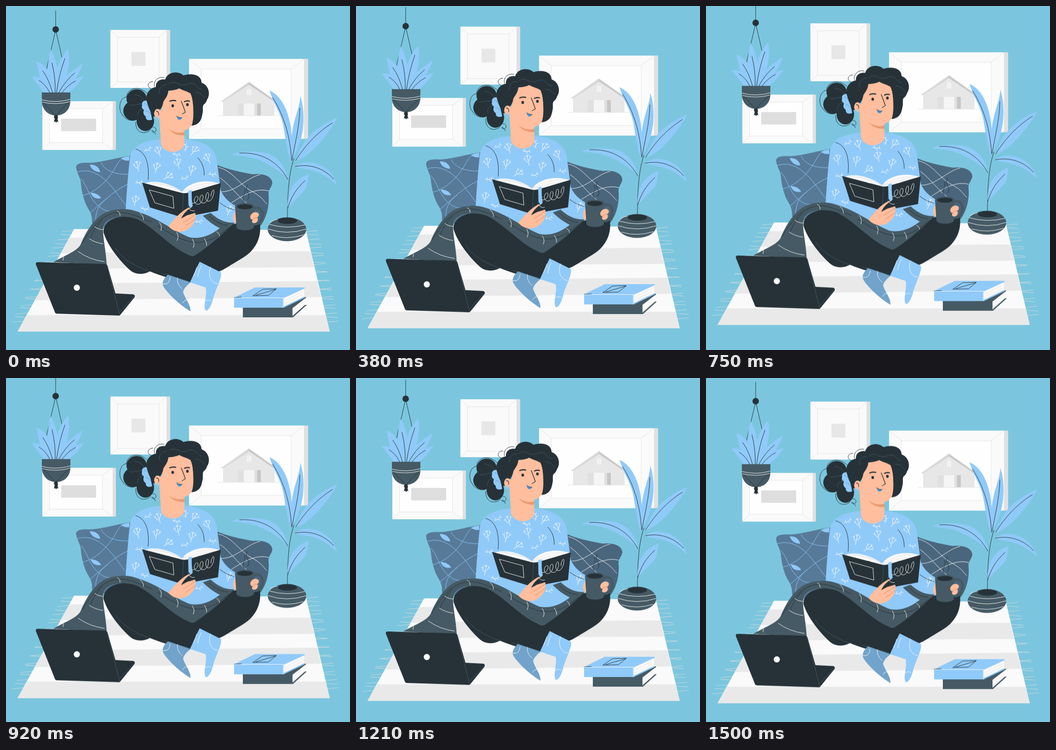
Write an HTML page without scripts that moves like this. It is 748 by 748 pixels and loops after 1.54 s.

```html
<!DOCTYPE html>
<html lang="en">
<head>
<meta charset="utf-8">
<title>Reading at home</title>
<style>
  html, body { margin: 0; width: 100%; height: 100%; overflow: hidden; background: #7bc6de; }
  svg { display: block; width: 100%; height: 100%; }
  .scene { animation: float 1540ms linear infinite; }
  @keyframes float {
    0%, 100% { transform: translateY(0); }
    8.4% { transform: translateY(-2.3px); }
    50% { transform: translateY(-14.8px); }
    86.4% { transform: translateY(-3.4px); }
  }
  .ink { fill: #263238; }
  .slate { fill: #455a64; }
  .sky { fill: #90caf9; }
  .skin { fill: #ffbe9d; }
  .paper { fill: #fafafa; }
  .shade { fill: #e0e0e0; }
  .grey { fill: #e7e7e7; }
  .line { fill: none; stroke: #263238; stroke-width: 1; stroke-linecap: round; stroke-linejoin: round; }
  .white { stroke: #fafafa; }
  .pale { stroke: #e4e4e4; }
  .blue { stroke: #90caf9; }
  .dim { stroke: #455a64; }
  .fringe { fill: none; stroke: #d5dcda; stroke-width: 27; }
</style>
</head>
<body>
<svg viewBox="0 0 748 748" aria-label="Woman reading a book on a rug">
  <defs>
    <path id="sprig" class="line white" d="M0 11Q1 2 0-8M0 4Q-5 2-6-4M0 1Q5-1 6-6M0-8l-3-3M0-8V-12M0-8l3-3M-6-4l-3-1M-6-4l0-4M6-6l3-1M6-6v-4"/>
    <path id="twig" class="line white" d="M-6 3Q0 3 6-3M-2 3l-2-5M2 1l5 2M6-3l0-4M6-3l4 0"/>
    <g id="fringe" class="fringe">
      <path stroke-dasharray=".9 17" d="M0 4V210" transform="skewY(-5)"/>
      <path stroke-dasharray=".9 19" d="M0 12V206" transform="skewY(4)"/>
    </g>
  </defs>
  <rect width="748" height="748" fill="#7bc6de"/>

  <g class="scene">
    <!-- Wall pictures -->
    <g>
      <path class="shade" d="M349 52h8v126h-8z"/>
      <path class="paper" d="M227 52h122v126H227z"/>
      <path class="line pale" d="M243 68h90v97h-90zM227 52l16 16M349 52l-16 16M227 178l16-13M349 178l-16-13"/>
      <path class="grey" d="M273 100h30v30h-30z"/>
    </g>
    <g>
      <path class="shade" d="M648 115h9v174h-9z"/>
      <path class="paper" d="M398 115h250v174H398z"/>
      <path fill="#fefefe" d="M425 137h195v130H425z"/>
      <path class="line pale" d="M425 137h195v130H425zM398 115l27 22M648 115l-28 22M398 289l27-22M648 289l-28-22"/>
      <path class="grey" d="M472 238v-32l56-38 56 38v32z"/>
      <path fill="#c9c9c9" d="M528 165l61 43h-6l-55-37-56 37h-5z"/>
      <path fill="#dcdcdc" d="M528 165l-61 43h5l56-39z"/>
      <path class="shade" d="M504 212h50v26h-50z"/>
      <path fill="#f5f5f5" d="M517 212h23v26h-23z"/>
      <path fill="#c6c6c6" d="M546 212h8v26h-8z"/>
      <path fill="#f5f5f5" d="M524 182l4-3 5 3v12h-9z"/>
      <path class="line pale" d="M528 180v14M460 238.5h134"/>
    </g>
    <g>
      <path class="shade" d="M232 207h7v106h-7z"/>
      <path class="paper" d="M79 207h153v106H79z"/>
      <path fill="#fefefe" d="M95 223h115v74H95z"/>
      <path class="line pale" d="M95 223h115v74H95zM79 207l16 16M232 207l-22 16M79 313l16-16M232 313l-22-16"/>
      <path fill="#dedede" d="M120 245h76v27h-76z"/>
    </g>

    <!-- Hanging plant -->
    <path class="line" d="M108 10V52L86 146M108 52l16 70"/>
    <circle class="ink" cx="108" cy="51" r="7"/>
    <g class="sky">
      <path d="M56 154C76 152 92 162 104 188H82C74 176 66 168 56 154z"/>
      <path d="M66 120C88 127 102 152 108 188H90C74 168 71 141 66 120z"/>
      <path d="M97 95C109 112 119 155 112 188H98C88 164 89 121 97 95z"/>
      <path d="M135 94C142 120 131 167 117 188H103C103 154 115 112 135 94z"/>
      <path d="M167 125C160 148 142 177 121 188H108C115 160 143 142 167 125z"/>
      <path d="M169 153C160 166 149 180 136 188H112C126 167 149 157 169 153z"/>
    </g>
    <path class="line" d="M72 162Q86 170 95 188M80 141Q94 161 101 188M100 124Q108 156 107 188M128 114Q115 150 110 188M149 146Q129 162 115 188M151 163Q135 171 122 188"/>
    <path class="slate" d="M78 188h62v18C140 226 126 238 109 238S78 226 78 206z"/>
    <path class="line" d="M79 208Q94 222 108 239Q122 222 139 208"/>
    <path class="line white" d="M78 204Q109 212 140 203M79 209Q109 216 139 208"/>
    <path class="ink" d="M106 237h6l1 6-1 3 2 6-3-1-2 3-2-3-3 1 2-7-2-4z"/>

    <!-- Rug -->
    <use href="#fringe" transform="translate(138 485) skewX(-28.9)"/>
    <use href="#fringe" transform="translate(664 485) skewX(13)"/>
    <path class="paper" d="M148 485L652 487 704 708H25z"/>
    <path fill="#e9e9e9" d="M138 504L212 504V538L119 538zM200 536L662 533 670 568 200 571zM83 604L677 598 685 633 63 640zM46 672H695L704 708H25z"/>

    <!-- Cushions -->
    <path fill="#577a98" d="M153 354C149 341 166 340 183 341C215 339 243 329 273 325L300 480H205C195 479 188 478 187 469C188 452 180 444 174 432C167 414 165 404 163 388C163 374 155 366 153 354z"/>
    <path class="line blue" d="M155 361C190 350 217 376 237 402S255 428 262 434M167 412C199 404 225 375 239 349S262 329 268 328M163 376C178 392 180 417 201 435S235 444 247 442M183 449C205 432 232 402 266 387M207 341C215 358 237 367 267 366M195 472C194 451 199 433 220 418"/>
    <g class="sky">
      <path d="M182 345C194 344 203 351 205 361C193 361 185 354 182 345z"/>
      <path d="M250 331L268 326 268 336C261 337 253 335 250 331z"/>
      <path d="M184 406C195 406 203 411 207 418C195 421 187 415 184 406z"/>
    </g>
    <path fill="#4a667d" d="M458 345C480 355 514 362 537 366C561 364 576 370 579 383C580 393 569 398 571 412C573 438 565 462 555 476L540 488H455z"/>
    <path class="line white" d="M462 351C493 358 507 388 533 402S559 424 567 430M469 404C501 404 525 372 552 367M466 374C490 391 506 418 533 436M490 428C519 409 545 395 571 402"/>

    <!-- Floor plant -->
    <path class="line" d="M612 466C612 423 613 369 626 332"/>
    <g class="sky">
      <path d="M573 184C598 194 612 225 618 256C623 287 624 314 620 339C612 320 609 297 604 266C600 237 581 211 573 184z"/>
      <path d="M640 196C650 226 648 264 642 286C637 307 629 324 621 335C618 310 620 280 626 255C632 231 639 216 640 196z"/>
      <path d="M720 243C704 249 674 266 659 283C645 299 635 318 630 337C656 329 679 302 695 282C705 268 714 257 720 243z"/>
      <path d="M490 323C512 315 544 314 567 320C592 328 608 350 614 377C602 363 577 347 555 337C535 327 511 326 490 323z"/>
      <path d="M629 350C642 336 667 337 688 348C706 358 715 373 720 390C710 380 696 369 679 362C661 354 645 355 629 350z"/>
      <path d="M658 366C640 371 622 388 617 404C613 419 611 430 613 440C627 423 642 409 650 400C656 390 655 379 658 366z"/>
    </g>
    <path class="line" d="M580 199C605 239 618 284 621 336M639 222C638 266 627 303 622 335M710 254C676 275 648 306 630 336M508 320C553 317 591 337 613 377M629 349C666 341 697 358 712 376M650 380C631 397 619 417 613 439"/>
    <ellipse class="slate" cx="611" cy="485.5" rx="42" ry="26"/>
    <ellipse class="ink" cx="612" cy="467" rx="21" ry="7"/>
    <path class="line white" d="M573 475Q611 486 650 476M570 485Q611 499 653 485M578 499Q611 509 646 498M590 464Q577 467 574 471"/>

    <!-- Hair behind the face -->
    <g class="ink">
      <ellipse cx="284" cy="202" rx="22" ry="21"/>
      <ellipse cx="276" cy="228" rx="21" ry="21"/>
      <ellipse cx="303" cy="250" rx="19" ry="22"/>
      <path d="M290 200L318 205 324 240 300 245z"/>
      <path d="M380 160H420C436 176 440 200 432 212C425 217 430 226 427 235C425 250 418 259 404 260L384 230z"/>
    </g>
    <path class="line" d="M308 191C289 171 264 178 262 198C246 199 243 228 254 237M253 236C259 248 276 252 283 247M282 252C281 279 305 280 314 269M319 263C330 263 327 276 320 274S319 266 325 279"/>
    <path class="line dim" d="M303 214C286 210 277 219 269 215M303 224C285 224 285 236 287 240M303 208C295 201 295 194 280 193"/>
    <path class="sky" d="M296 216C294 208 301 204 309 206L318 247C308 251 303 246 304 240C298 237 298 230 300 226C296 223 294 220 296 216z"/>
    <path class="line" style="stroke:#5f9acb" d="M301 212Q309 214 311 222M304 229Q311 228 314 235"/>

    <!-- Sweater and neck -->
    <path class="sky" d="M336 290C300 292 271 305 269 333C265 370 262 410 260 445L330 465 366 497C398 513 447 508 470 492L499 474 500 435C484 427 471 413 467 400L459 340C456 307 430 294 388 289z"/>
    <path class="skin" d="M333 235L337 301C346 324 383 321 388 301V262z"/>
    <path fill="#eb996e" d="M354 267C365 276 378 277 388 274V281C374 282 360 277 354 267z"/>
    <path class="skin" d="M343 200C348 180 376 172 402 188C407 202 410 239 405 256C397 275 369 276 353 266C341 260 335 249 334 244C324 246 320 236 323 227C327 220 334 222 338 228z"/>
    <path class="ink" d="M306 207C302 190 314 178 326 176C325 163 337 158 346 160C351 143 374 140 386 151C402 145 426 149 425 167C440 171 446 191 437 204C435 212 428 216 424 218L408 244C408 220 407 202 401 190C391 184 382 183 377 179C369 183 359 184 353 184C352 197 345 202 342 209C341 218 336 224 335 226C326 219 321 229 322 239C315 235 310 221 306 207z"/>
    <path class="line dim" d="M354 170C369 158 375 178 394 170S414 180 425 181M412 188C424 188 426 195 432 199M334 190C331 178 341 170 350 171"/>
    <path class="line" d="M323 175C319 162 333 152 344 156M317 181C306 176 306 166 319 164"/>
    <g class="line">
      <path style="stroke-width:2.4" d="M356 207Q362 204 369 206M388 208Q394 205 399 207"/>
      <path style="stroke-width:1.4" d="M381 207Q386 219 390 231L383 235M327 229Q333 229 332 237"/>
      <circle cx="330" cy="244" r="4" style="stroke:#90caf9;stroke-width:1.4"/>
    </g>
    <ellipse class="ink" cx="362.5" cy="217" rx="2.8" ry="3.2"/>
    <ellipse class="ink" cx="394.5" cy="214.5" rx="2.8" ry="3.2"/>
    <path fill="#4594dd" d="M371 240Q377 244 383 243Q380 249 375 247Q372 245 371 240z"/>
    <path class="line" d="M371 239Q376 244 383 243"/>

    <!-- Sweater pattern -->
    <g>
      <use href="#sprig" transform="translate(332 317) rotate(-18)"/>
      <use href="#sprig" transform="translate(286 349) rotate(-12)"/>
      <use href="#sprig" transform="translate(327 352) rotate(12)"/>
      <use href="#sprig" transform="translate(374 343) rotate(-12)"/>
      <use href="#sprig" transform="translate(404 358) rotate(14)"/>
      <use href="#sprig" transform="translate(409 315) rotate(38)"/>
      <use href="#sprig" transform="translate(439 332) rotate(-25)"/>
      <use href="#sprig" transform="translate(352 371) rotate(55)"/>
      <use href="#sprig" transform="translate(281 424) rotate(10)"/>
      <use href="#sprig" transform="translate(485 445) rotate(20)"/>
      <use href="#twig" transform="translate(307 312)"/>
      <use href="#twig" transform="translate(369 322) rotate(35)"/>
      <use href="#twig" transform="translate(390 309) rotate(-60)"/>
      <use href="#twig" transform="translate(288 383) rotate(20)"/>
      <use href="#twig" transform="translate(447 365) rotate(30)"/>
      <use href="#twig" transform="translate(300 440) rotate(40)"/>
      <use href="#twig" transform="translate(418 468) rotate(15)"/>
      <use href="#twig" transform="translate(387 374) rotate(10)"/>
    </g>
    <path class="line" d="M282 311C304 317 312 342 309 378M417 330C427 341 431 352 431 368M465 428Q480 440 496 443"/>

    <!-- Legs, blanket and socks -->
    <path class="ink" d="M490 474L552 471C556 502 545 531 511 550C490 562 474 574 461 578L395 550 400 535z"/>
    <path class="ink" d="M212 492C211 466 245 451 279 461C325 470 370 515 421 556L400 602C367 596 337 587 313 577C297 585 281 585 268 573C247 553 221 522 212 492z"/>
    <path class="slate" d="M428 456L445 450C459 463 477 473 497 471C478 489 450 517 410 543C404 546 399 542 392 539C352 520 323 482 284 463C255 453 222 458 213 475C207 492 217 524 219 563L103 557C130 541 156 533 163 517C174 491 190 464 213 451C231 441 260 438 282 446C328 459 365 490 399 503C427 508 448 496 465 483C450 476 438 466 428 456z"/>
    <path class="line" d="M165 516C181 492 197 467 220 456C253 438 285 458 316 470M183 505Q194 480 209 465M330 478C363 499 397 519 427 513S469 494 484 482M442 457Q457 474 482 477"/>
    <path class="line white" d="M157 534Q182 552 214 556M181 506Q194 515 211 517M193 480Q202 487 211 486M242 446Q249 449 248 456M291 450Q299 455 299 465M333 470Q340 476 337 488M371 492Q377 501 372 510M405 507Q412 517 407 525M431 506Q437 513 436 521M458 491Q465 495 464 500M125 546L124 553"/>
    <path class="line dim" d="M238 526C248 547 285 569 313 577M341 582Q371 592 399 599"/>
    <path fill="#71a3cb" d="M352 584L401 601C393 608 386 615 385 622C389 636 402 649 401 664C384 654 356 631 343 611C337 601 344 592 352 584z"/>
    <path class="sky" d="M421 556L467 579C471 590 456 614 450 638C446 653 440 663 434 662C428 651 438 629 434 612L400 601z"/>
    <path class="line white" d="M341 604Q355 608 357 590M384 646Q388 639 395 639M373 591Q370 604 383 615M415 568L408 587M445 568C437 588 448 603 460 604M432 642Q440 637 446 641M425 565Q419 575 417 588"/>

    <!-- Open book and hand -->
    <path class="paper" d="M301 386C321 377 358 385 383 404C397 384 431 375 465 386L398 408H383z"/>
    <path class="line pale" d="M307 385Q350 386 382 404M318 383Q356 388 382 404M384 404Q412 384 455 385M385 404Q415 392 462 388"/>
    <path class="ink" d="M296 384L377 405Q388 409 399 405L467 385 461 445 398 457Q389 461 381 459L313 438z"/>
    <path class="line dim" d="M386 408L383 458M397 406L395 457"/>
    <path class="line white" d="M312 400L363 414 365 440 324 428zM402 428C412 432 420 421 417 415S404 424 413 430S431 419 428 412S416 424 426 428S443 414 440 407S430 420 438 424S453 410 452 402S444 411 446 414"/>
    <path class="sky" d="M396 402L404 400Q403 419 406 435L401 440 397 433z"/>
    <path class="skin" d="M353 479C366 463 378 449 394 440C400 436 405 441 399 447L412 451C414 463 408 477 398 484C384 495 366 493 353 479z"/>
    <path class="ink" d="M381 462C385 452 396 441 403 439L412 444 408 451 394 455z"/>
    <path class="line" style="stroke:#d9895f" d="M386 470Q397 464 411 454M390 478Q401 472 411 463"/>
    <path class="line white" d="M399 442Q404 447 410 445"/>

    <!-- Cup -->
    <path class="line" d="M518 425C509 414 525 409 518 397M525 421C536 409 516 404 525 389"/>
    <path class="skin" d="M500 447C493 450 492 462 496 471L503 474z"/>
    <path d="M538 441C550 435 560 444 557 458C555 471 547 475 537 474" fill="none" stroke="#455a64" stroke-width="6"/>
    <path class="slate" d="M498 436C499 426 540 426 541 436L539 481C536 490 503 490 501 481z"/>
    <ellipse class="ink" cx="519.5" cy="436.5" rx="17" ry="5.5"/>
    <path class="skin" d="M532 455C536 448 544 446 549 451C551 455 549 458 546 460C550 465 546 473 538 472C534 471 534 466 537 465C531 464 530 459 532 455z"/>
    <path class="line" d="M536 464Q541 459 546 460" style="stroke:#d9895f"/>

    <!-- Laptop -->
    <path class="ink" d="M69 557L216 561Q220 562 221 566L238 625 277 627Q282 629 279 634L249 671Q247 674 243 673L111 669Q107 669 106 665L65 562Q64 557 69 557z"/>
    <path class="line dim" d="M220 564L247 671M277 633L249 664"/>
    <circle class="paper" cx="154" cy="612.5" r="6.7"/>

    <!-- Books -->
    <path class="slate" d="M515 656L543 633H653L650 637V650H654L624 677H515z"/>
    <path class="paper" d="M623 657L650 636V650L623 674z"/>
    <path class="line pale" d="M626 662L647 643M626 668L648 649"/>
    <path class="sky" d="M496 634L541 612H650L648 616V632L650 634 604 656H496z"/>
    <path class="paper" d="M604 635L648 615V632L604 653z"/>
    <path class="line pale" d="M606 641L643 622M606 647L644 628"/>
    <path class="line" d="M537 630L558 616 588 615 571 629zM543 629L587 616M496 634L512 633"/>
    <path class="line white" d="M497 634.5H603V655"/>
  </g>
</svg>
</body>
</html>
```
